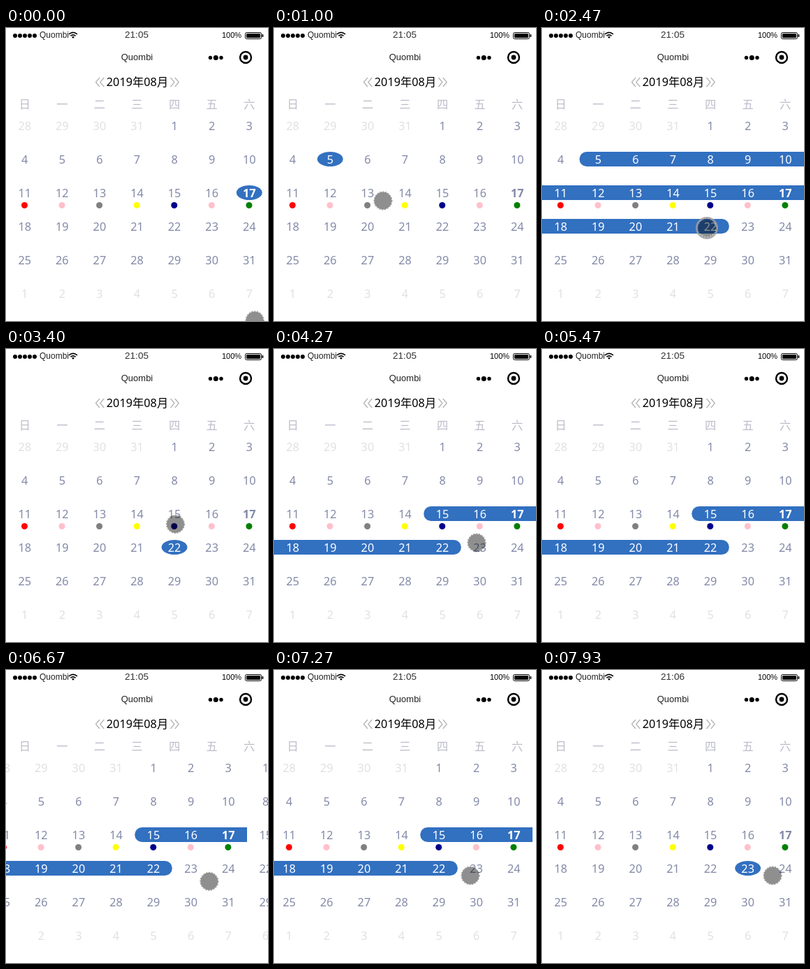
Animation, 375 px wide and 419 px high, one loop 8 s. Source, as an HTML page:

```html
<!DOCTYPE html>
<html lang="zh">
<head>
<meta charset="utf-8">
<title>Calendar</title>
<style>
html, body { margin: 0; width: 100%; height: 100%; overflow: hidden; background: #fff; }
svg { display: block; width: 375px; height: 419px; }
text { text-anchor: middle; font-family: "Noto Sans", "Noto Sans CJK SC", "Noto Sans CJK", sans-serif; font-size: 16.3px; }
.ui { font-family: "Liberation Sans", Arial, sans-serif; }
</style>
</head>
<body>
<svg id="stage" viewBox="0 0 375 419">
  <g id="pages"></g>
  <g id="bar">
    <text class="ui" x="69" y="14.3" style="font-size:12px" fill="#222">Quombi</text>
    <path d="M90 8.8Q96 4 102 8.8M92.4 11.2Q96 8.4 99.6 11.2" fill="none" stroke="#000" stroke-width="1.7"/>
    <path d="M94 12.6Q96 11.2 98 12.6L96 15Z"/>
    <text class="ui" id="clock" x="187" y="14" style="font-size:13.6px" fill="#333">21:05</text>
    <text class="ui" x="323" y="14.2" style="font-size:11px" fill="#000">100%</text>
    <rect x="342.5" y="6.5" width="23" height="9" rx="2" fill="none" stroke="#000"/>
    <rect x="344" y="8" width="20" height="6" rx="1"/>
    <rect x="366.5" y="9" width="1.8" height="4" rx=".8"/>
    <text class="ui" x="187.5" y="46" style="font-size:13px" fill="#222">Quombi</text>
    <circle cx="292.5" cy="42.5" r="2.7"/><circle cx="300.3" cy="42.5" r="3.5"/><circle cx="308" cy="42.5" r="2.7"/>
    <circle cx="343" cy="42" r="8" fill="none" stroke="#000" stroke-width="2.4"/><circle cx="343" cy="42" r="3.4"/>
    <path d="M134 71l-5.5 6.5 5.5 6.5M140.3 71l-5.5 6.5 5.5 6.5M235.5 71l5.5 6.5-5.5 6.5M241.8 71l5.5 6.5-5.5 6.5" fill="none" stroke="#b4b4b4" stroke-width="1.3"/>
    <text x="188" y="83" fill="#000">2019年08月</text>
  </g>
  <g id="pointer">
    <circle id="ring" r="14.5" fill="none" stroke="#a0a0a0" stroke-opacity=".85" stroke-width="3"/>
    <circle r="12.5" fill-opacity=".44"/>
    <circle r="13" fill="none" stroke="#000" stroke-opacity=".44" stroke-dasharray="2 2"/>
  </g>
</svg>
<script>
const LOOP = 8000, STEP = 200 / 3, CELL = 375 / 7, ROW = 48;
const BLUE = '#3270c0', DAY = '#838aa8', FAINT = '#e1e1e4';
const LEAD = 4; // cells before day 1
const $ = id => document.getElementById(id);

// pointer glides: first step, last step, x, y
const glides = [
  [0, 10, 86, 191], [12, 15, 156, 247], [15, 19, 226, 284],
  [36, 37, 236, 286], [37, 41, 247, 288], [48, 52, 241, 238], [54, 59, 265, 211],
  [61, 64, 290, 277], [64, 69, 315, 296], [69, 74, 306, 293], [74, 82, 147, 434],
  [83, 83, 390, 385], [90, 101, 281, 294], [109, 117, 291, 310], [117, 119, 330, 294]
];
// step, first day, last day
const picks = [[0, 17, 17], [13, 5, 5], [25, 5, 22], [45, 22, 22], [55, 15, 22], [116, 23, 23]];

const clamp = v => Math.min(1, Math.max(0, v));
const colX = c => (c + 0.5) * CELL;

function pointerAt(s) {
  let x = 356, y = 418;
  for (const [from, to, tx, ty] of glides) {
    if (s < from) break;
    const k = to > from ? clamp((s - from) / (to - from)) : 1;
    x += (tx - x) * k;
    y += (ty - y) * k;
  }
  return `translate(${x} ${y})`;
}

// the month is pulled left, then springs back
function pullAt(s) {
  return -36 * clamp((s - 95) / 6) * Math.exp(-Math.max(0, s - 104) / 2.53) * (s < 116);
}

function add(parent, tag, attrs, label) {
  const el = document.createElementNS('http://www.w3.org/2000/svg', tag);
  for (const name in attrs) el.setAttribute(name, attrs[name]);
  if (label !== undefined) el.textContent = label;
  parent.appendChild(el);
  return el;
}

[...'日一二三四五六'].forEach((ch, c) =>
  add($('bar'), 'text', { x: colX(c), y: 115.3, fill: '#bcbccb' }, ch));

for (let i = 0; i < 5; i++) add($('bar'), 'circle', { cx: 13 + i * 7, cy: 11, r: 3 });

const bars = add($('pages'), 'g', {});
const days = [];

function month(left, lead, length) {
  for (let i = 0; i < 42; i++) {
    const day = i - lead + 1, inside = day > 0 && day <= length;
    const label = inside ? day : day < 1 ? 31 + day : day - length;
    const el = add($('pages'), 'text', {
      x: left + colX(i % 7), y: 146 + ROW * Math.floor(i / 7), fill: inside ? DAY : FAINT
    }, label);
    if (inside && !left) days[day] = el;
  }
}
month(0, LEAD, 31);
month(375, 0, 30);

['red', 'pink', 'gray', 'yellow', 'darkblue', 'pink', 'green'].forEach((fill, c) =>
  add($('pages'), 'circle', { cx: colX(c) - 0.3, cy: 253.5, r: 4.5, fill }));

function barPath(x0, x1, y, roundL, roundR) {
  const r = 10.5, l = roundL ? r : 0, q = roundR ? r : 0;
  return `M${x0 + l} ${y}H${x1 - q}a${q} ${r} 0 0 1 0 21H${x0 + l}a${l} ${r} 0 0 1 0 -21Z`;
}

let shown = null;
function select(pick) {
  if (pick === shown) return;
  shown = pick;
  const [, first, last] = pick;
  days.forEach((el, d) => {
    const on = d >= first && d <= last;
    el.setAttribute('fill', on ? '#fff' : DAY);
    el.setAttribute('font-weight', d === 17 ? 700 : on ? 500 : 400);
  });
  bars.replaceChildren();
  const a = first + LEAD - 1, b = last + LEAD - 1;
  for (let row = Math.floor(a / 7); row <= Math.floor(b / 7); row++) {
    const y = 129 + ROW * row;
    if (a === b) {
      add(bars, 'ellipse', { cx: colX(a % 7), cy: y + 10.5, rx: 18.4, ry: 10.5, fill: BLUE });
      continue;
    }
    const from = Math.max(a, row * 7), to = Math.min(b, row * 7 + 6);
    add(bars, 'path', {
      d: barPath((from - row * 7) * CELL, (to - row * 7 + 1) * CELL, y, from === a, to === b),
      fill: BLUE
    });
  }
}

function draw(now) {
  const s = Math.floor((now % LOOP + 5) / STEP);
  $('pointer').setAttribute('transform', pointerAt(s));
  $('ring').setAttribute('visibility', s === 37 || s === 38 ? 'visible' : 'hidden');
  $('pages').setAttribute('transform', `translate(${pullAt(s)} 0)`);
  select(picks.filter(p => p[0] <= s).pop());
  $('clock').textContent = s >= 118 ? '21:06' : '21:05';
}

const start = performance.now();
function tick() {
  draw(performance.now() - start);
  requestAnimationFrame(tick);
}
tick();
</script>
</body>
</html>
```
